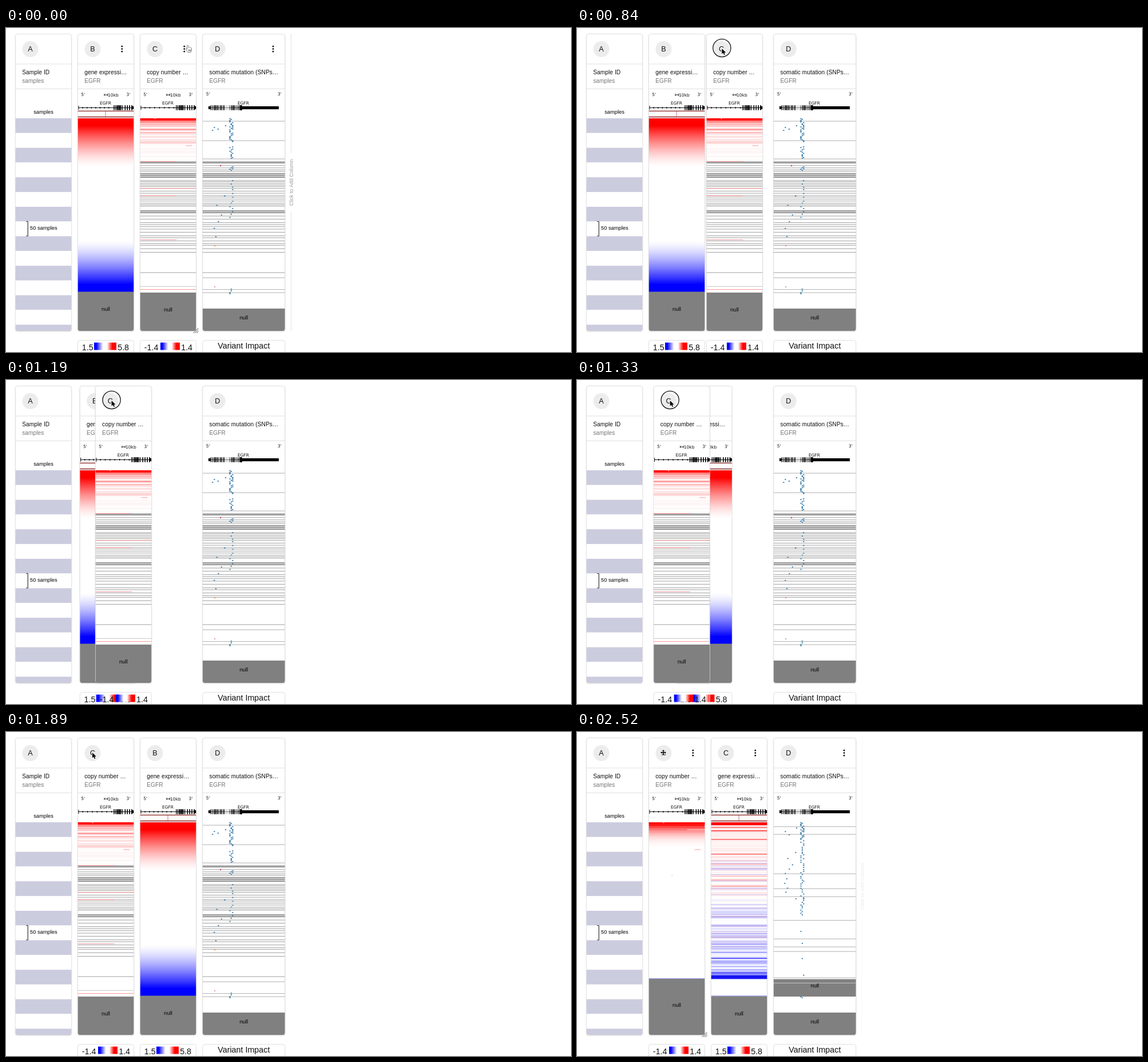
Animation, 988 px wide and 567 px high, one loop 2.59 s. Source, as an HTML page with a canvas:

```html
<!DOCTYPE html>
<html lang="en">
<head>
<meta charset="utf-8">
<title>Reordering columns</title>
<style>
html, body { margin: 0; width: 100%; height: 100%; overflow: hidden; background: #fff; }
canvas { display: block; width: 988px; height: 567px; }
</style>
</head>
<body>
<canvas id="stage" width="988" height="567"></canvas>
<script>
const ctx = document.getElementById('stage').getContext('2d');
const LOOP = 2590, STEP = 70;
const PRESS = 630, DRAG = 770, RELEASE = 1890, SORT = 2310;
const SANS = '"Liberation Sans", Arial, sans-serif';
const WIDE = '"DejaVu Sans", Verdana, sans-serif';
const GREY = '#808080', EDGE = '#e0e0e0', DOT = '#3a7ca8';
const TOP = 158, BOTTOM = 530, LEFT_SLOT = 125.5, RIGHT_SLOT = 234.5;

// [ms, x] key points, joined by straight lines
const pointerPath = [[70, 318], [420, 268.5], [700, 268], [980, 238.7], [1190, 184.6], [1300, 164],
  [1470, 156.5], [1610, 151]];
const dragPath = [[770, RIGHT_SLOT], [980, 210.4], [1190, 156.4], [1300, 136], [1470, LEFT_SLOT]];

const rand = i => { const v = Math.sin(i * 12.9898 + 4.1) * 43758.5453; return v - Math.floor(v); };
const clamp = v => Math.max(0, Math.min(1, v));
const mix = (a, b, p) => a + (b - a) * p;
const smooth = p => p * p * (3 - 2 * p);
const span = (t, from, to) => clamp((t - from) / (to - from));
function along(path, t) {
  let x = path[0][1];
  for (let i = 1; i < path.length; i++) x = mix(x, path[i][1], span(t, path[i - 1][0], path[i][0]));
  return x;
}
const fade = v => Math.round(255 * (1 - clamp(v)));
const red = v => `rgb(255,${fade(v)},${fade(v)})`;
const blue = v => `rgb(${fade(v)},${fade(v)},255)`;

function rect(x, y, w, h, color) {
  ctx.fillStyle = color;
  ctx.fillRect(x, y, w, h);
}
function line(x1, y1, x2, y2, color, width = 1) {
  ctx.strokeStyle = color;
  ctx.lineWidth = width;
  ctx.beginPath();
  ctx.moveTo(x1, y1);
  ctx.lineTo(x2, y2);
  ctx.stroke();
}
function circle(x, y, r) {
  ctx.beginPath();
  ctx.arc(x, y, r, 0, 7);
}
function disc(x, y, r, color) {
  ctx.fillStyle = color;
  circle(x, y, r);
  ctx.fill();
}
function text(str, x, y, size, color = '#111', align = 'left', family = SANS) {
  ctx.font = `${size}px ${family}`;
  ctx.textAlign = align;
  ctx.fillStyle = color;
  ctx.fillText(str, x, y);
}
const tiny = (str, x, y, align) => text(str, x, y, 7.5, '#111', align, WIDE);

function nullArea(x, w, y, end = BOTTOM) {
  rect(x, y, w, end - y, GREY);
  text('null', x + w / 2, (y + end) / 2 - 0.5, 9.5, '#000', 'center');
}
// Bands whose colour depends on height
function bands(x, w, from, to, step, color) {
  for (let y = from; y < to; y += step) rect(x, y, w, step, color(y));
}
// Loosely spaced rows
function rows(from, to, gap, seed, paint) {
  for (let i = seed, y = from; y < to; y += gap * (0.6 + 0.8 * rand(i++))) paint(y, i);
}

function outline(x, y, w, h) {
  ctx.beginPath();
  ctx.roundRect(x, y, w, h, 4);
}
function card(x, w, letter, title, sub, menu, body) {
  ctx.save();
  ctx.shadowColor = 'rgba(0,0,0,.22)';
  ctx.shadowBlur = 2;
  ctx.shadowOffsetY = 1;
  ctx.fillStyle = '#fff';
  outline(x, 10.5, w, 519.5);
  ctx.fill();
  ctx.restore();
  ctx.strokeStyle = EDGE;
  ctx.lineWidth = 1;
  ctx.stroke();
  line(x, 63, x + w, 63, EDGE);
  line(x, 106.5, x + w, 106.5, EDGE);
  ctx.save();
  outline(x, 10.5, w, 519.5);
  ctx.clip();
  body(x, w);
  ctx.restore();
  disc(x + 26, 37, 14, '#ececec');
  text(letter, x + 26, 41.4, 12.6, '#111', 'center');
  ctx.letterSpacing = '0.05px';
  text(title, x + 11.7, 81.2, 10.2);
  text(sub, x + 11.7, 95.6, 10.2, '#777');
  ctx.letterSpacing = '0px';
  if (menu) for (const dy of [-4.5, 0, 4.5]) disc(x + w - 20.7, 36.7 + dy, 1.4, '#111');
}

function legendCard(x, w) {
  ctx.strokeStyle = EDGE;
  ctx.lineWidth = 1;
  outline(x, 546.5, w, 40);
  ctx.stroke();
}
function legend(x, low, high, from, to) {
  legendCard(x, 98);
  const g = ctx.createLinearGradient(x + from, 0, x + to, 0);
  [[0.1, '#00f'], [0.4, '#fff'], [0.58, '#fff'], [0.82, '#f00']].forEach(s => g.addColorStop(...s));
  rect(x + from, 550.5, to - from, 13, g);
  text(low, x + 7.3, 563.8, 14.3);
  text(high, x + to + 2.2, 563.8, 14.3);
}

function gene(x, arrowGap) {
  tiny("5'", x + 5.8, 118.8);
  tiny("3'", x + 85, 118.8);
  tiny('10kb', x + 52.6, 119.6);
  line(x + 46.5, 117, x + 52, 117, '#222');
  for (const tick of [46.5, 52]) line(x + tick, 115, x + tick, 119, '#222');
  tiny('EGFR', x + 48.5, 134.2, 'center');
  line(x + 1, 139.5, x + 97, 139.5, '#000', 0.9);
  rect(x + 1, 136, 1, 7, '#000');
  for (let a = x + 8; a < x + 60; a += arrowGap) {
    ctx.fillStyle = '#000';
    ctx.beginPath();
    ctx.moveTo(a, 137.7);
    ctx.lineTo(a + 2.6, 139.5);
    ctx.lineTo(a, 141.3);
    ctx.fill();
  }
  for (let e = 62.6; e < 80; e += 2.5) rect(x + e, 135.2, e > 67 && e < 75 ? 2.1 : 1.3, 8.6, '#000');
  for (let e = 82; e < 95; e += 3.9) rect(x + e, 135.2, 1.7, 8.6, '#000');
  rect(x + 94, 136.8, 4, 5.4, '#000');
}

function samples(x, w) {
  text('samples', x + w / 2, 149.8, 9.3, '#000', 'center');
  bands(x, w, TOP, BOTTOM, 25.8, y => Math.round((y - TOP) / 25.8) % 2 ? '#fff' : '#ccccdf');
  for (const y of [338.7, 364]) line(x + 18.5, y, x + 22, y, '#333');
  line(x + 21.8, 338.7, x + 21.8, 364, '#333', 1.2);
  text('50 samples', x + 25.5, 352.6, 9.3, '#000');
}

function expression(sorted) {
  return (x, w) => {
    gene(x, 7.6);
    line(x, 145.4, x + w, 145.4, '#8a2020', 1.2);
    line(x + 48.6, 146, x + 48.6, 155, '#c06060', 0.9);
    line(x, 155.6, x + w, 155.6, '#7a0000', 1.4);
    if (sorted) {
      bands(x, w, TOP, 242, 2, y => red(((243 - y) / 73) ** 1.5));
      bands(x, w, 374, 462, 2, y => blue(((y - 371) / 77) ** 1.4));
      nullArea(x, w, 461.5);
      return;
    }
    bands(x, w, TOP, 432, 1.4, y => {
      const p = (y - TOP) / 274, r = rand(y), s = rand(y + 500);
      const v = (0.8 - 1.6 * p + (s - 0.5) * 0.6) * (r > 0.5 ? r : 0.1);
      const tint = p > 0.2 && p < 0.8 && r > 0.75;
      return tint ? `rgba(80,20,180,${0.15 + 0.25 * s})` : v > 0 ? red(v) : blue(-v);
    });
    rect(x, TOP, w, 5, '#f00');
    rect(x, 426, w, 5.8, '#1515f0');
    rect(x, 461.2, w, 1.4, '#9c9cf0');
    nullArea(x, w, 462.4);
  };
}

function nullLines(x, w) {
  const grey = y => rect(x, y - 0.5, w, 1.1, '#a8a8a8');
  rows(234, 252, 3.2, 1, grey);
  rows(267, 316, 3.5, 20, grey);
  rows(329, 394, 4.6, 40, grey);
  grey(428);
  for (const y of [234, 254, 257, 260, 319, 322]) rect(x, y, w, 2.2, '#989898');
}

function copyNumber(sorted) {
  return (x, w) => {
    gene(x, 8.4);
    if (sorted) {
      bands(x, w, TOP, 207, 1.5, y => red(((208 - y) / 46) ** 2.8));
      rect(x + 67, 170.6, w - 67, 1, '#ffe4e4');
      rect(x + 40, 250.5, 1.5, 1, '#aaa');
      rect(x, 430.8, w, 1.4, '#a0a0e8');
      nullArea(x, w, 432);
    } else {
      bands(x, w, 163, 208, 1.35, y =>
        red((1 - (y - 163) / 54) * (rand(y) > 0.5 ? 0.25 + 0.45 * rand(y + 90) : 0.08)));
      bands(x, w, 208, 227, 4.4, () => '#fff');
      rows(211, 226, 4.4, 5, y => rect(x, y, w, 0.9, '#fde4e4'));
      nullLines(x, w);
      for (const y of [233, 280.3, 293, 370, 457]) rect(x, y, y % 1 || y > 400 ? w : 64, 1.1, '#ffa0a0');
      rect(x, 451.8, w, 1, '#c4c4c4');
      nullArea(x, w, 463);
    }
    rect(x, TOP, w, 4.4, '#f00');
    rect(x + 80, 205.4, 11, 1, '#f4a0a0');
    rect(x + 25, 158.4, 2, 1.2, '#fcc');
  };
}

function spot(x, y, color = DOT) { rect(x - 1.1, y - 0.8, 2.3, 1.7, color); }
function cluster(from, to, gap, seed) {
  rows(from, to, gap, seed, (y, i) => spot(391.5 + Math.floor(rand(i + 300) * 3) * 2.4, y));
}
function scatter(from, to, gap, seed) {
  rows(from, to, gap, seed, (y, i) => spot(359 + 45 * rand(i + 600), y));
}

function mutation(first) {
  return (x, w) => {
    tiny("5'", 349.8, 118.4);
    tiny("3'", 475, 118.4);
    tiny('EGFR', 415, 134.4, 'center');
    line(354, 139.5, 410, 139.5, '#555');
    rect(354, 137, 3.5, 5, '#000');
    for (let e = 357.6; e < 409; e += 2.8) {
      const pale = e > 381 && e < 390;
      rect(e, 135.3, 1 + rand(e) * 1.2, 8.5, pale ? '#bbb' : '#111');
    }
    rect(409, 135.2, 4, 8.8, '#000');
    rect(412, 137, 65, 5.2, '#000');
    const pale = y => rect(x, y - 0.5, w, 1.2, '#bcbcbc');
    if (first) {
      nullLines(x, w);
      [163, 197, 229, 437, 457.5, 463].forEach(pale);
      cluster(158.5, 200, 1.6, 11);
      cluster(208, 228, 1.7, 60);
      cluster(243, 249, 1.5, 83);
      cluster(267, 335, 5, 90);
      cluster(457, 467, 2.5, 120);
      scatter(171, 180, 2.5, 3);
      scatter(294, 375, 14, 8);
      spot(375, 241, '#d02030');
      spot(365, 381, '#f07848');
      spot(365, 453, '#e09090');
    } else {
      [165.5, 179, 248, 274, 288, 329.5, 362, 376, 384, 430].forEach(pale);
      nullArea(x, w, 432.5, 463);
      rect(x, 438.8, w, 1.2, '#b8b8b8');
      cluster(158.5, 187, 1.4, 11);
      cluster(188, 320, 2.9, 130);
      cluster(349, 430, 22, 160);
      cluster(463.5, 466, 1.4, 190);
      scatter(168, 182, 5, 3);
      scatter(211, 296, 9, 8);
    }
    nullArea(x, w, 491);
  };
}

function addColumn(alpha) {
  ctx.save();
  ctx.globalAlpha = alpha;
  line(498.5, 10, 498.5, 218, EDGE);
  line(498.5, 322, 498.5, 530, EDGE);
  ctx.translate(501.7, 270.5);
  ctx.rotate(-Math.PI / 2);
  text('Click to Add Column', 0, 0, 9, '#999', 'center');
  ctx.restore();
}

function resizeGrip(x) {
  for (const d of [2.5, 5.5, 8.5]) line(x - d + 1, 534, x + 1.5, 533.5 - d, '#444', 0.9);
}

const shapes = {
  arrow: new Path2D('M0 0V9.6L2.3 7.5L3.8 11L5.5 10.2L4 6.9H7Z'),
  move: new Path2D('M0-5L2-2.8H.7V-.7H2.8V-2L5 0L2.8 2V.7H.7V2.8H2L0 5L-2 2.8H-.7V.7H-2.8V2L-5 0L-2.8-2V-.7H-.7V-2.8H-2Z'),
  hand: new Path2D('M-2-5.5Q-1-6.3-.3-5.2V-1.8Q.8-2.6 1.6-1.6Q2.7-2.2 3.4-1.2Q5.2-1.6 5.3.4V2.6L4.2 6H-1.4L-4.6 1.4Q-4.4-.2-2.2 1.4Z')
};
function pointerKind(t) {
  if (t < 140) return 'hand';
  return t >= 350 && t < PRESS || t > SORT ? 'move' : 'arrow';
}
function drawPointer(kind, x, y) {
  const hand = kind === 'hand';
  ctx.save();
  ctx.translate(hand ? x + 1 : x, y);
  ctx.lineJoin = 'round';
  ctx.strokeStyle = hand ? '#000' : '#fff';
  ctx.fillStyle = hand ? '#fff' : '#000';
  ctx.lineWidth = hand ? 1 : 1.6;
  ctx.stroke(shapes[kind]);
  ctx.fill(shapes[kind]);
  if (hand) for (const f of [0.4, 2, 3.6]) line(f, 1.8, f, 4.4, '#000', 0.7);
  ctx.restore();
}

function pressRing(x, t) {
  ctx.save();
  ctx.globalAlpha = t >= RELEASE - STEP ? 0.4 : 1;
  ctx.strokeStyle = '#111';
  ctx.lineWidth = 1.3;
  circle(x, 35, t < DRAG ? 13.2 : 15.6);
  ctx.stroke();
  ctx.restore();
}

function draw(t) {
  const done = t >= SORT, menu = t < DRAG || done;
  const px = along(pointerPath, t), copyX = along(dragPath, t);
  const geneX = mix(LEFT_SLOT, RIGHT_SLOT, smooth(span(t, 1145, 1550)));

  rect(0, 0, 988, 567, '#fff');
  card(16.5, 98, 'A', 'Sample ID', 'samples', false, samples);
  card(343.8, 144, 'D', 'somatic mutation (SNPs…', 'EGFR', menu, mutation(!done));
  legendCard(343.8, 144);
  text('Variant Impact', 415.8, 561, 14.3, '#111', 'center');
  card(geneX, 98, done ? 'C' : 'B', 'gene expressi…', 'EGFR', menu, expression(!done));
  legend(geneX, '1.5', '5.8', 28.5, 67.5);
  card(copyX, 98, done ? 'B' : 'C', 'copy number …', 'EGFR', menu, copyNumber(done));
  legend(copyX, '-1.4', '1.4', 35.5, 69.5);

  if (t < DRAG) addColumn(1);
  else if (t >= 2520) addColumn(0.2);
  if (t < DRAG || t > SORT) resizeGrip(copyX + 100.5);
  if (t >= PRESS && t < RELEASE) pressRing(px, t);
  drawPointer(pointerKind(t), px, 36);
}

const start = performance.now();
let shown = -1;
function tick() {
  const step = Math.floor(((performance.now() - start) % LOOP) / STEP);
  if (step !== shown) {
    shown = step;
    draw(step * STEP);
  }
  requestAnimationFrame(tick);
}
tick();
</script>
</body>
</html>
```
